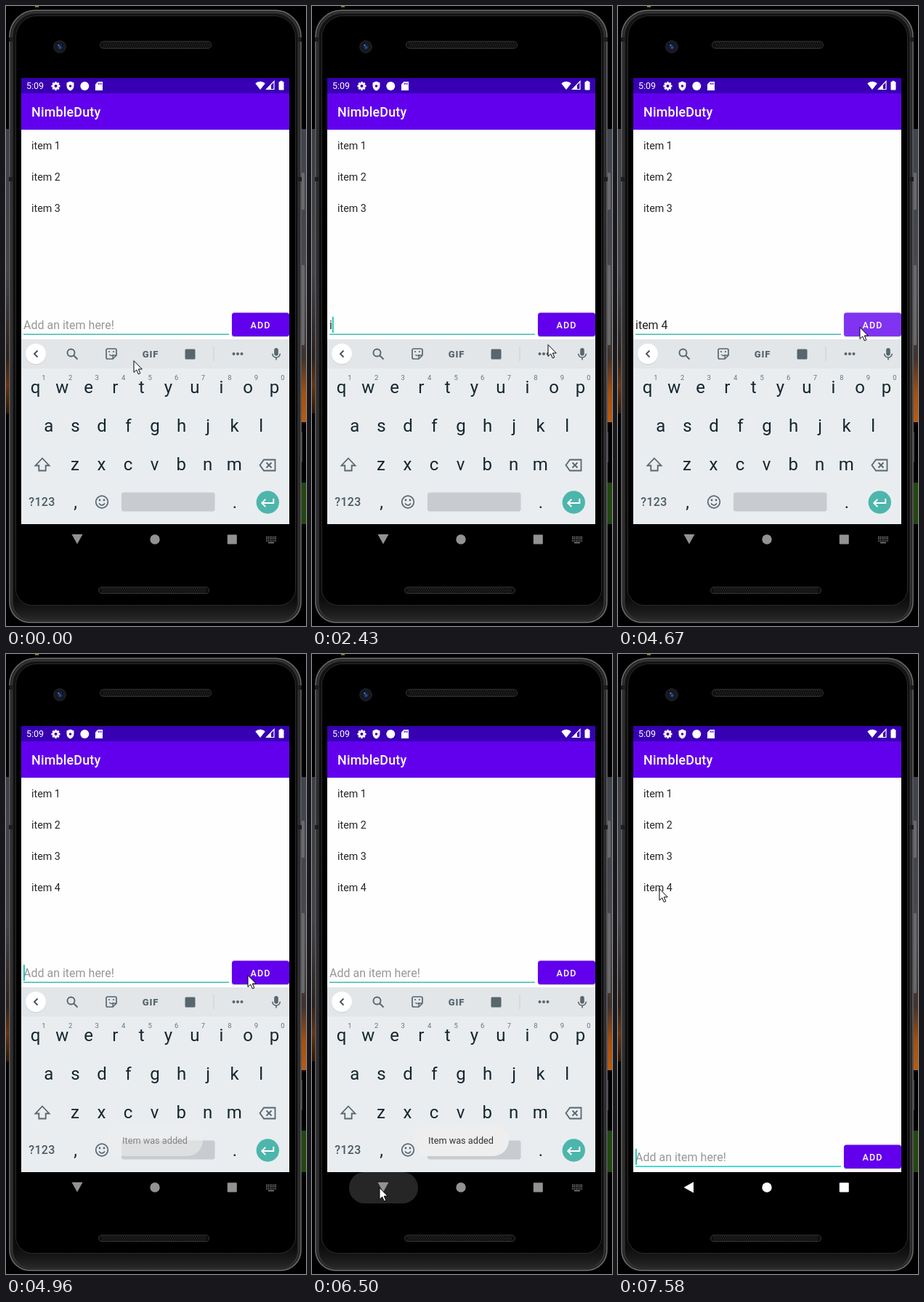
Write an HTML page with a canvas that moves like this. It is 413x852 px and loops after 8 s.

```html
<!DOCTYPE html>
<html lang="en">
<head>
<meta charset="utf-8">
<title>NimbleDuty</title>
<style>
html, body { margin: 0; width: 100%; height: 100%; overflow: hidden; background: #000; }
canvas { display: block; width: 413px; height: 852px; }
</style>
</head>
<body>
<canvas id="stage" width="413" height="852"></canvas>
<script>
const stage = document.getElementById('stage').getContext('2d');
let c = stage;
const LOOP = 8000, TAU = Math.PI * 2;
const INK = '#16262e', ICON = '#58666e';

// The screen refreshes in bursts: [first, last, count]
const bursts = [[0, 0, 1], [120, 510, 4], [820, 820, 1], [1410, 1410, 1], [2000, 2430, 4],
  [2730, 2730, 1], [3200, 3500, 3], [3930, 3930, 1], [4060, 4960, 7], [5080, 5960, 8],
  [6110, 6110, 1], [6230, 6660, 4], [6810, 7220, 4], [7340, 7580, 3]];
const ticks = bursts.flatMap(([a, b, n]) =>
  Array.from({ length: n }, (_, i) => n > 1 ? a + (b - a) * i / (n - 1) : a));

// Pointer path: [time, x, y]
const path = [[0, 176, 487], [510, 178, 442], [1870, 178, 442], [2290, 300, 470], [2430, 325, 465],
  [2730, 315, 466], [3500, 281, 471], [3930, 281, 471], [4600, 333, 441], [4960, 333, 441],
  [5080, 331, 428], [5300, 290, 386], [5700, 150, 786], [5960, 89, 734], [6230, 92, 733],
  [6660, 95, 732], [6700, 95, 732], [7220, 97, 356], [7580, 57, 322], [LOOP, 57, 322]];
const blinks = [380, 820, 1410, 2000, 2430, 3930, 4800, 5330, 5840, 6373, 6600, 7080, 7570];
const typing = [[2430, 'i'], [2730, 'ite'], [3200, 'item'], [3350, 'item '], [3500, 'item 4'], [4800, '']];

const clamp = v => Math.max(0, Math.min(1, v));
const lastOf = (list, t) => list.filter(e => e[0] <= t).pop();

function pointerAt(t) {
  const i = Math.max(1, path.findIndex(p => p[0] > t));
  const [a, b] = [path[i - 1], path[i]];
  const k = clamp((t - a[0]) / (b[0] - a[0]));
  return [a[1] + (b[1] - a[1]) * k, a[2] + (b[2] - a[2]) * k];
}

function box(x, y, w, h, fill, r = 0) {
  c.beginPath();
  c.roundRect(x, y, w, h, r);
  c.fillStyle = fill;
  c.fill();
}
function frame(x, y, w, h, color, r, lw = 1) {
  c.beginPath();
  c.roundRect(x, y, w, h, r);
  c.strokeStyle = color;
  c.lineWidth = lw;
  c.stroke();
}
function dot(x, y, r, fill) {
  c.beginPath();
  c.arc(x, y, r, 0, TAU);
  c.fillStyle = fill;
  c.fill();
}
function ring(x, y, r, color, lw, a = 0, b = TAU) {
  c.beginPath();
  c.arc(x, y, r, a, b);
  c.strokeStyle = color;
  c.lineWidth = lw;
  c.stroke();
}
function shape(x, y, d, fill, stroke, lw = 2) {
  c.save();
  c.translate(x, y);
  const p = new Path2D(d);
  if (fill) { c.fillStyle = fill; c.fill(p); }
  if (stroke) { c.strokeStyle = stroke; c.lineWidth = lw; c.stroke(p); }
  c.restore();
}
function text(s, x, y, size, color, { weight = 400, align = 'left', gap = 0 } = {}) {
  c.font = `${weight} ${size}px Roboto, sans-serif`;
  c.textAlign = align;
  c.letterSpacing = gap + 'px';
  c.fillStyle = color;
  c.fillText(s, x, y);
}
function fade(y0, y1, ...stops) {
  const g = c.createLinearGradient(0, y0, 0, y1);
  stops.forEach(([k, col]) => g.addColorStop(k, col));
  return g;
}

function speaker(x, y, w, h) {
  box(x, y, w, h, '#0e0e0e', h / 2);
  for (let j = 0; j < 3; j++)
    for (let i = 0; i < w / 3 - 3; i++)
      box(x + 4 + i * 3 + j % 2 * 1.5, y + 2 + j * (h - 5) / 2, 1.5, 1.2, '#333');
  frame(x + .5, y + .5, w - 1, h - 1, '#333', h / 2);
}

function drawPhone() {
  box(0, 0, 413, 852, '#000');
  box(40, 0, 5, 1.5, '#a8923a');
  box(0, 169, 5, 391, fade(169, 560, [0, '#3b3f47'], [.5, '#454449'], [.8, '#2a201a'], [.9, '#6a330c'], [1, '#2a1403']));
  box(407, 169, 6, 403, fade(169, 572, [0, '#3f444d'], [.55, '#4a494e'], [.78, '#40332d'], [.9, '#a5500f'], [1, '#b85c11']));
  box(407, 655, 6, 57, '#22480f');
  box(406, 229, 5, 51, '#69696c', 1.5);
  box(406, 356, 5, 110, '#69696c', 1.5);
  box(406, 585, 2, 42, '#444');

  const outer = [36, 36, 28, 28], inner = [29, 29, 22, 22];
  box(4, 5, 403, 843, '#232325', outer);
  frame(5, 6, 401, 841, '#6c6c6f', outer, 1.4);
  frame(8, 9, 395, 835, '#38383a', [33, 33, 26, 26], 1.4);
  box(10, 11, 391, 833, fade(11, 844, [0, '#111'], [.965, '#0c0c0c'], [.985, '#1a1a1a'], [1, '#282828']), [31, 31, 24, 24]);
  frame(13.5, 13.5, 385, 810, '#2b2b2d', inner);
  box(14, 14, 384, 809, '#000', inner);
  for (const y of [43, 235]) {
    box(4, y, 5, 6, '#1d1d1f');
    box(402, y, 5, 6, '#1d1d1f');
  }

  speaker(129, 48, 154, 11);
  speaker(127, 798, 153, 10);
  dot(74, 56, 9, '#17181b');
  ring(74, 56, 8, '#242529', 1);
  dot(74, 56, 4.5, '#101e3e');
  dot(74.5, 57, 2, '#2c4d86');
  dot(72.5, 54, 1, '#8295bd');
}

function drawStatus() {
  const W = '#fff', B = '#3700b3';
  box(21, 99, 369, 21, B);
  text('5:09', 28, 114, 12.5, W);
  for (let i = 0; i < 8; i++) {
    c.save();
    c.translate(68.5, 110);
    c.rotate(i * TAU / 8);
    box(-1.4, -6, 2.8, 4, W, .5);
    c.restore();
  }
  dot(68.5, 110, 4.4, W);
  dot(68.5, 110, 2, B);
  shape(88.5, 110, 'M0-6.5L5-4.5V-.5C5 3 3 5.5 0 6.5C-3 5.5-5 3-5-.5V-4.5Z', W);
  dot(88.5, 110, 1.8, B);
  dot(108.3, 110, 6, W);
  shape(128, 110, 'M-1.5-6H5V6H-5V-2.5Z', W);
  for (let i = 0; i < 3; i++) box(126.7 + i * 2, 105.5, 1, 2.5, B);
  shape(350, 109, 'M0 6L-6.7-2.6C-3-6.3 3-6.3 6.7-2.6Z', W);
  shape(364, 109, 'M5-5.5V5.5H-5.5Z', null, W, 1.2);
  shape(364, 109, 'M1-1V5H-5Z', W);
  box(375.5, 104, 7, 11.5, W, 1);
  box(377.5, 102.8, 3, 2, W);
}

function drawApp(t) {
  box(21, 170, 369, 542, '#fefefe');
  box(21, 120, 369, 50, '#6200ee');
  text('NimbleDuty', 35, 152, 17.9, '#fff', { weight: 500, gap: .2 });
  const count = t >= 4800 ? 4 : 3;
  for (let i = 0; i < count; i++) text('item ' + (i + 1), 35, 197 + i * 43, 14.3, '#252525');
}

function drawInput(t) {
  c.save();
  if (t >= 6600) c.translate(0, 253);
  const entry = (lastOf(typing, t) || [0, ''])[1];
  text(entry || 'Add an item here!', 24, 444, 16, entry ? '#222' : '#979797');
  box(24, 450.5, 283, 1.4, t >= 6600 ? '#11d6c4' : '#3fbdb0');
  if (blinks.filter(b => b <= t).length % 2) {
    const x = 24 + (entry ? c.measureText(entry).width : 0);
    box(x, 427, 1.8, 22, '#14c3b2');
  }
  c.shadowColor = 'rgba(0,0,0,.2)';
  c.shadowBlur = 2;
  c.shadowOffsetY = 1;
  box(311, 421.5, 79, 32.5, '#6200ee', 3.5);
  c.shadowColor = 'transparent';
  if (t >= 4500 && t < 4900) box(311, 421.5, 79, 32.5, 'rgba(255,255,255,.2)', 3.5);
  text('ADD', 336.5, 443, 12.5, '#fff', { weight: 500, gap: 1.1 });
  c.restore();
}

function drawToolStrip() {
  box(21, 458, 369, 40, '#e2e6e9');
  dot(41, 479, 14.3, '#cfd4d7');
  dot(41, 478, 14, '#fff');
  shape(41, 478, 'M2.5-4.5L-2 0L2.5 4.5', null, '#455058', 1.8);
  ring(89.5, 476.5, 5, ICON, 1.9);
  shape(93, 480, 'M0 0L5.5 5.5', null, ICON, 2);
  shape(145, 478, 'M-5-7H5Q7-7 7-5V2L2 7H-5Q-7 7-7 5V-5Q-7-7-5-7Z', null, ICON, 1.7);
  shape(145, 478, 'M2 6.5V2H6.5', null, ICON, 1.4);
  dot(142, 475, 1.1, ICON);
  dot(148, 475, 1.1, ICON);
  ring(145, 477, 3.3, ICON, 1.3, .7, 2.5);
  text('GIF', 199, 483, 13, ICON, { weight: 900, align: 'center', gap: .8 });
  box(246.5, 471.5, 14, 14, ICON, 1.5);
  box(285.5, 468, 1, 20, '#c8cdd1');
  for (const x of [313.5, 319, 324.5]) dot(x, 478, 2, ICON);
  box(369.2, 470, 5.6, 10.5, ICON, 2.8);
  ring(372, 477.7, 5.3, ICON, 1.6, 0, Math.PI);
  box(371.2, 483, 1.6, 3.5, ICON);
}

function drawKeyboard() {
  const mid = { align: 'center' };
  box(21, 498, 369, 260, '#e9edf0');
  drawToolStrip();
  const rows = [['qwertyuiop', 40.6, 532], ['asdfghjkl', 58.8, 585], ['zxcvbnm', 95, 638]];
  for (const [keys, x, y] of rows)
    [...keys].forEach((ch, i) => text(ch, x + i * 36.55, y, 24, INK, mid));
  for (let i = 0; i < 10; i++)
    text((i + 1) % 10, 52 + i * 36.55, 514, 9.5, '#66737a', mid);

  shape(50, 630, 'M0-8.5L9.5 1.5H4.7V8.5H-4.7V1.5H-9.5Z', null, ICON, 1.8);
  shape(360, 631, 'M-10.5 0L-5-7.5H10.5V7.5H-5Z', null, ICON, 1.8);
  shape(362, 631, 'M-3.5-3.5L3.5 3.5M3.5-3.5L-3.5 3.5', null, ICON, 1.8);
  text('?123', 49.5, 687, 16, '#4b5a63', { weight: 500, align: 'center', gap: .3 });
  text(',', 95.5, 690, 24, INK, mid);
  text('.', 315, 690, 24, INK, mid);
  ring(132, 681.5, 8.3, ICON, 1.7);
  dot(129, 679, 1.4, ICON);
  dot(135, 679, 1.4, ICON);
  ring(132, 682, 4, ICON, 1.5, .3, Math.PI - .3);
  box(159, 668.5, 128.5, 26, '#c8ccd0', 3);
  dot(360.3, 682, 15.7, '#4db6ac');
  shape(360.3, 682, 'M8-5V1H-7M-3-4L-8 1L-3 6', null, '#fff', 2);
}

// The keyboard is kept as one layer so that it can fade as a whole
function makeLayer(paint) {
  const layer = document.createElement('canvas');
  layer.width = 413;
  layer.height = 852;
  c = layer.getContext('2d');
  paint();
  c = stage;
  return layer;
}
const keyboard = makeLayer(drawKeyboard);

function showKeyboard(t) {
  const k = clamp((t - 6520) / 195);
  if (k === 1) return;
  const shift = 53 * k;
  c.save();
  c.beginPath();
  c.rect(21, 421, 369, k ? 329 : 291);
  c.clip();
  c.globalAlpha = 1 - k;
  if (k) box(21, 421, 369, 37 + shift, '#ececec');
  c.drawImage(keyboard, 0, Math.round(shift));
  c.restore();
}

function drawNav(t) {
  const closed = t >= 6600, col = closed ? '#fff' : '#929292';
  const press = t < 6300 ? 0 : .15 * clamp((7000 - t) / 300);
  if (press) box(51, 712, 95, 43, `rgba(255,255,255,${press})`, 21);
  shape(98, 733, closed ? 'M-7.5 0L6-7.5V7.5Z' : 'M-7.5-7H7.5L0 6.5Z', col);
  dot(205, 733, 6.7, col);
  box(304.8, 726.5, 13, 13, col, 1);
  if (closed) return;
  for (let r = 0; r < 3; r++)
    for (let i = 0; i < 6; i++) box(358 + i * 2.5, 729 + r * 2.6, 1.5, 1.5, '#858585');
  box(361, 736.8, 8, 1.5, '#858585');
}

function drawToast(t) {
  const a = Math.min(clamp((t - 4850) / 200), clamp((7080 - t) / 180));
  if (!a) return;
  c.save();
  c.globalAlpha = a;
  box(139.5, 646.5, 131.5, 43.5, '#eeeeee', 21.7);
  text('Item was added', 205, 673, 12.7, '#333', { align: 'center' });
  c.restore();
}

function drawPointer(t) {
  const [x, y] = pointerAt(t).map(Math.round);
  shape(x, y + .5, 'M0 0V16L3.7 12.5L6.3 18.4L8.8 17.3L6.3 11.5H11.3Z', '#fff', '#000', 1);
}

function draw(now) {
  const time = now % LOOP;
  const t = ticks.filter(k => k <= time + .01).pop() || 0;
  drawPhone();
  drawStatus();
  drawApp(t);
  drawInput(t);
  showKeyboard(t);
  drawNav(t);
  drawToast(t);
  drawPointer(t);
}

const start = performance.now();
function loop() {
  draw(performance.now() - start);
  requestAnimationFrame(loop);
}
loop();
</script>
</body>
</html>
```
